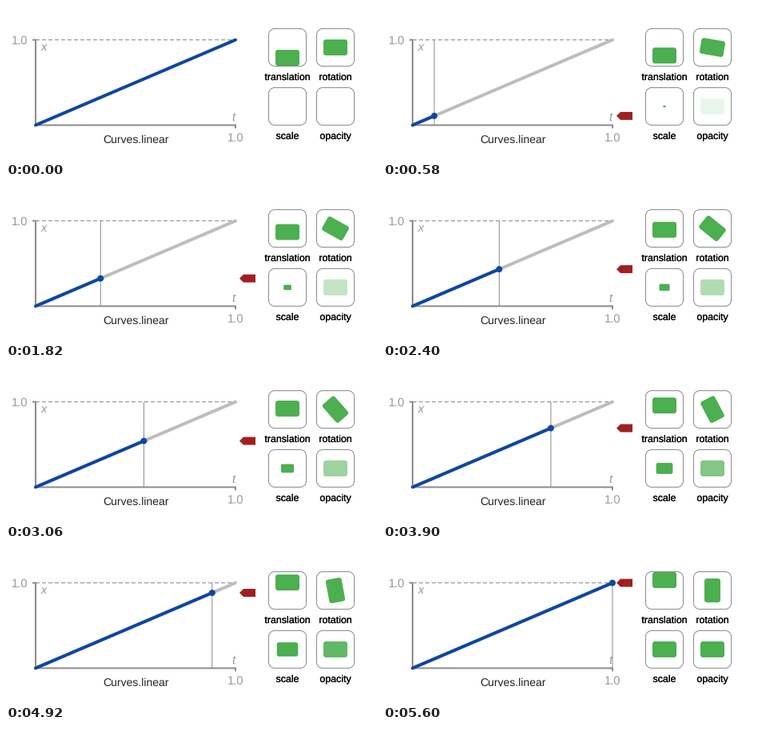
Recreate the animation shown at these times as a matplotlib script. Size 464 px wide and 192 px high, loop 5.62 s.

```python
import matplotlib.pyplot as plt
from matplotlib.animation import FuncAnimation
from matplotlib.patches import Circle, PathPatch, Polygon
from matplotlib.path import Path
from matplotlib.patheffects import withStroke
from matplotlib.transforms import Affine2D

W, H, DPI = 464, 192, 64
PX = 72 / DPI  # points per pixel
STEPS = 120
TICK = 20
FRAMES = 281

BLUE, GREEN, RED = "#0d47a1", "#4caf50", "#a02020"
AXIS, PALE, GREY = "#8c8c8c", "#bdbdbd", "#999999"
X0, X1, Y0, Y1 = 37, 287, 149.5, 42.5

plt.rcParams.update({
    "font.family": "Liberation Sans",
    "text.hinting": "none",
    "path.snap": False,
    "toolbar": "None",
})

fig = plt.figure(figsize=(W / DPI, H / DPI), dpi=DPI, facecolor="white")
ax = fig.add_axes([0, 0, 1, 1])
ax.set(xlim=(0, W), ylim=(H, 0))
ax.axis("off")


def line(xs, ys, color, width, cap="butt", z=1, **kw):
    return ax.plot(xs, ys, color=color, lw=width * PX, solid_capstyle=cap,
                   zorder=z, **kw)[0]


def label(x, y, s, size, color, ha="center", weight=0, style="normal"):
    text = ax.text(x, y, s, fontsize=size * PX, color=color, ha=ha,
                   va="baseline", style=style, zorder=5)
    if weight:
        text.set_path_effects([withStroke(linewidth=weight * PX, foreground=color)])


def round_rect(cx, cy, w, h, r, **kw):
    """Centred rectangle with circular corners."""
    a, b, k = w / 2, h / 2, 0.4477 * r
    corner = [(a - r, -b), (a - k, -b), (a, -b + k), (a, -b + r)]
    points = []
    for sx, sy in ((1, 1), (1, -1), (-1, -1), (-1, 1)):
        turn = 1 if sx == sy else -1
        points += [(cx + sx * x, cy + sy * y) for x, y in corner[::turn]]
    codes = [Path.LINETO, Path.CURVE4, Path.CURVE4, Path.CURVE4] * 4
    codes[0] = Path.MOVETO
    path = Path(points + points[:1], codes + [Path.CLOSEPOLY])
    return ax.add_patch(PathPatch(path, **kw))


def tile(cx, cy, name):
    """Framed cell with a green block centred on the block's own origin."""
    round_rect(cx, cy, 47, 47, 7.5, fc="none", ec=AXIS, lw=PX, zorder=2)
    label(cx, cy + 41, name, 12.4, "black", weight=0.15)
    return round_rect(0, 0, 30, 20, 3, fc=GREEN, lw=0, zorder=3)


def place(block, cx, cy, angle=0, scale=1):
    move = Affine2D().scale(scale).rotate_deg(angle).translate(cx, cy)
    block.set_transform(move + ax.transData)


# Axes of the graph
line([X0, X1], [Y1, Y1], AXIS, 1, dashes=(5, 3), dash_capstyle="butt")
line([X0 - 4, X0, X0, X1, X1], [Y1, Y1, Y0, Y0, Y0 + 4], AXIS, 2,
     solid_joinstyle="miter")
label(27.3, 48, "1.0", 14.8, GREY, ha="right")
label(287, 170, "1.0", 14.8, GREY)
label(43.5, 56, "x", 14.5, GREY, ha="left", style="italic")
label(284, 143.5, "t", 15, GREY, style="italic")
label(162, 172, "Curves.linear", 14, "#212121")

# Moving parts of the graph
marker = line([], [], AXIS, 1, z=2)
rest = line([X0, X1], [Y0, Y1], PALE, 4, "round", z=3)
curve = line([], [], BLUE, 4, "round", z=4)
dot = ax.add_patch(Circle((X0, Y0), 4, fc=BLUE, lw=0, zorder=5))
pointer = ax.add_patch(Polygon([(0, 0)], fc=RED, lw=0, zorder=4))

shift = tile(352, 52, "translation")
spin = tile(412, 52, "rotation")
grow = tile(352, 126, "scale")
fade = tile(412, 126, "opacity")
place(fade, 412, 126)


def step_at(frame):
    """Steps come in threes: one held for 100 ms, then two of 20 ms."""
    if frame == 0:
        return 0
    group, tick = divmod(frame - 1, 7)
    return 3 * group + 1 + max(0, tick - 4)


def draw(frame):
    t = step_at(frame) / STEPS
    running = t > 0
    x, y = X0 + (X1 - X0) * t, Y0 + (Y1 - Y0) * t

    for part in (marker, rest, dot, pointer, grow):
        part.set_visible(running)
    marker.set_data([x, x], [Y1, Y0])
    curve.set_data([X0, x if running else X1], [Y0, y if running else Y1])
    dot.center = x, y
    pointer.set_xy([(292, y), (297, y - 5), (312, y - 5),
                    (312, y + 5), (297, y + 5)])

    place(shift, 352, 65 - 26 * t)
    place(spin, 412, 52, angle=90 * t)
    place(grow, 352, 126, scale=max(t, 1e-3))
    fade.set_alpha(t)
    return marker, rest, curve, dot, pointer, shift, spin, grow, fade


anim = FuncAnimation(fig, draw, frames=FRAMES, interval=TICK,
                     repeat=True, repeat_delay=0, blit=False)
plt.show()
```
